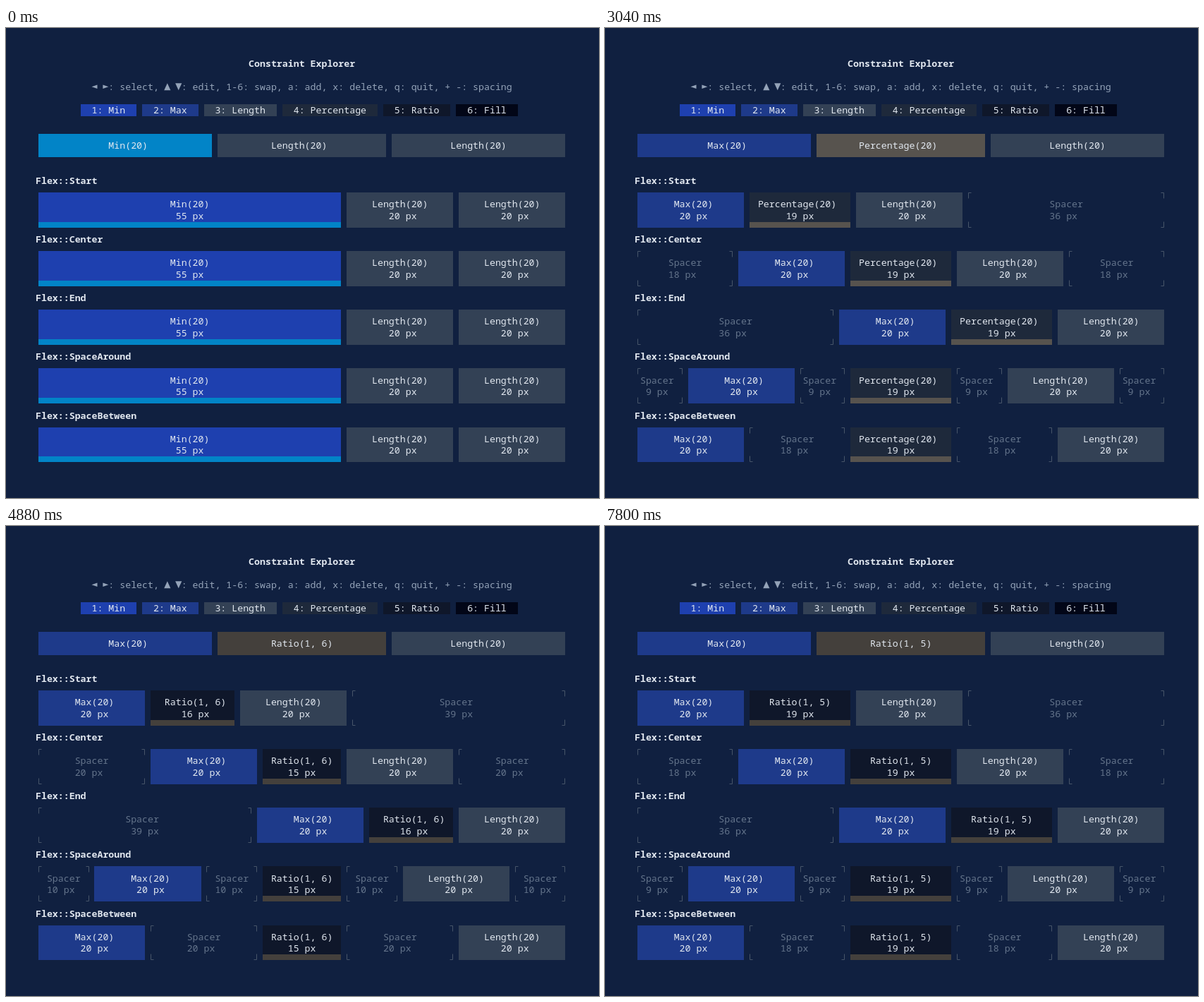
Write an HTML page with a canvas that moves like this. It is 841 px wide and 666 px high and loops after 8000 ms.

```html
<!DOCTYPE html>
<html lang="en">
<head>
<meta charset="utf-8">
<title>Constraint Explorer</title>
<style>
html, body { margin: 0; width: 100%; height: 100%; overflow: hidden; background: #102040; }
canvas { display: block; width: 841px; height: 666px; }
</style>
</head>
<body>
<canvas id="stage" width="841" height="666"></canvas>
<script>
const ctx = document.getElementById('stage').getContext('2d');
const LOOP = 8000;
const COLS = 95, CW = 7.95, RH = 16.63, X0 = 42, Y0 = 41.7;
const FONT = '13.25px "Noto Sans Mono", "DejaVu Sans Mono", monospace';
const BACK = '#102040', TEXT = '#e2e8f0', HINT = '#94a3b8', FAINT = '#64748b', LINE = '#475569';

// kind: [normal colour, selected colour]
const COLORS = {
  Min: ['#1e40af', '#0284c7'],
  Max: ['#1e3a8a', '#0369a1'],
  Length: ['#334155', '#78716c'],
  Percentage: ['#1e293b', '#57534e'],
  Ratio: ['#0f172a', '#44403c'],
  Fill: ['#020617', '#292524']
};

const item = (kind, arg, size) => ({ kind, size, label: `${kind}(${arg})` });
const min = item('Min', 20, 55);
const max = item('Max', 20, 20);
const len = item('Length', 20, 20);
const percent = item('Percentage', 20, 19);
const ratio = n => item('Ratio', `1, ${n}`, COLS / n);

const STEPS = [
  { at: 0, items: [min, len, len], sel: 0 },
  { at: 1040, items: [max, len, len], sel: 0 },
  { at: 2000, items: [max, len, len], sel: 1 },
  { at: 3040, items: [max, percent, len], sel: 1 },
  { at: 3920, items: [max, ratio(5), len], sel: 1 },
  { at: 4880, items: [max, ratio(6), len], sel: 1 },
  { at: 5840, items: [max, ratio(7), len], sel: 1 },
  { at: 6840, items: [max, ratio(6), len], sel: 1 },
  { at: 7800, items: [max, ratio(5), len], sel: 1 }
];

// share of the free space in each gap: before, between, between, after
const FLEX = {
  Start: [0, 0, 0, 1],
  Center: [1 / 2, 0, 0, 1 / 2],
  End: [1, 0, 0, 0],
  SpaceAround: [1 / 4, 1 / 4, 1 / 4, 1 / 4],
  SpaceBetween: [0, 1 / 2, 1 / 2, 0]
};

const px = col => X0 + col * CW;
const py = row => Y0 + row * RH;
const half = n => Math.floor(n / 2);

function rect(c0, r0, c1, r1, color) {
  const x = Math.round(px(c0)), y = Math.round(py(r0));
  ctx.fillStyle = color;
  ctx.fillRect(x, y, Math.round(px(c1)) - x, Math.round(py(r1)) - y);
}

function write(str, col, row, color, bold) {
  ctx.font = (bold ? 'bold ' : '') + FONT;
  ctx.fillStyle = color;
  const y = Math.round(py(row + 0.5) + 4.6);
  [...str].forEach((ch, i) => {
    if (ch !== ' ') ctx.fillText(ch, px(col + i), y);
  });
}

function centered(str, col, width, row) {
  write(str, col + half(width) - half(str.length), row, TEXT);
}

function arrow(col, row, dx, dy) {
  const x = px(col + 0.5), y = py(row + 0.5);
  const w = dx ? 4 : 4.6, h = dx ? 2.8 : 5;
  ctx.fillStyle = HINT;
  ctx.beginPath();
  ctx.moveTo(x + dx * w, y + dy * h);
  ctx.lineTo(x - dx * w - dy * w, y - dy * h - dx * h);
  ctx.lineTo(x - dx * w + dy * w, y - dy * h + dx * h);
  ctx.fill();
}

function drawHeader() {
  write('Constraint Explorer', 38, 0, TEXT, true);
  write('   : select,    : edit, 1-6: swap, a: add, x: delete, q: quit, + -: spacing', 10, 2, HINT);
  arrow(10, 2, -1, 0);
  arrow(12, 2, 1, 0);
  arrow(23, 2, 0, -1);
  arrow(25, 2, 0, 1);
  let col = 8;
  Object.keys(COLORS).forEach((kind, i) => {
    const label = `${i + 1}: ${kind}`;
    const end = col + label.length + 4;
    rect(col, 4, end, 5, COLORS[kind][0]);
    write(label, col + 2, 4, TEXT);
    col = end + 1;
  });
}

function drawTabs({ items, sel }) {
  const edges = [0, 32, 63, COLS];
  items.forEach((it, i) => {
    const a = edges[i], b = edges[i + 1];
    rect(a + 0.5, 6.5, b - 0.5, 8.5, COLORS[it.kind][+(i === sel)]);
    centered(it.label, a, b - a, 7);
  });
}

function drawBlock(it, col, width, row, selected) {
  const [color, light] = COLORS[it.kind];
  rect(col + 0.5, row + 0.5, col + width - 0.5, row + 3.5, color);
  if (selected) rect(col + 0.5, row + 3, col + width - 0.5, row + 3.5, light);
  centered(it.label, col, width, row + 1);
  centered(`${width} px`, col, width, row + 2);
}

function drawSpacer(col, width, row) {
  const left = Math.round(px(col + 0.5)) + 0.5;
  const right = Math.round(px(col + width - 0.5)) - 0.5;
  const top = Math.round(py(row + 0.5)) + 0.5;
  const bottom = Math.round(py(row + 3.5)) - 0.5;
  ctx.strokeStyle = LINE;
  ctx.lineWidth = 1;
  ctx.beginPath();
  for (const [x, dx] of [[left, 4], [right, -4]]) {
    for (const [y, dy] of [[top, 8], [bottom, -8]]) {
      ctx.moveTo(x + dx, y);
      ctx.lineTo(x, y);
      ctx.lineTo(x, y + dy);
    }
  }
  ctx.stroke();
  const size = `${width} px`;
  write('Spacer', col + half(width - 6), row + 1, FAINT);
  write(size, col + half(width - size.length), row + 2, FAINT);
}

function drawFlex(name, row, { items, sel }) {
  write('Flex::' + name, 0, row, TEXT, true);
  const free = COLS - items.reduce((sum, it) => sum + it.size, 0);
  let pos = 0;
  const advance = size => {
    const start = Math.round(pos);
    pos += size;
    return [start, Math.round(pos) - start];
  };
  FLEX[name].forEach((share, i) => {
    const [gapCol, gap] = advance(share * free);
    if (gap > 0) drawSpacer(gapCol, gap, row + 1);
    if (i < items.length) {
      const [col, width] = advance(items[i].size);
      drawBlock(items[i], col, width, row + 1, i === sel);
    }
  });
}

function draw(step) {
  ctx.fillStyle = BACK;
  ctx.fillRect(0, 0, 841, 666);
  drawHeader();
  drawTabs(step);
  Object.keys(FLEX).forEach((name, i) => drawFlex(name, 10 + i * 5, step));
}

const begin = performance.now();
function tick(now) {
  const t = Math.max(0, now - begin) % LOOP;
  draw(STEPS.filter(s => s.at <= t).pop());
  requestAnimationFrame(tick);
}
tick(begin);
</script>
</body>
</html>
```
